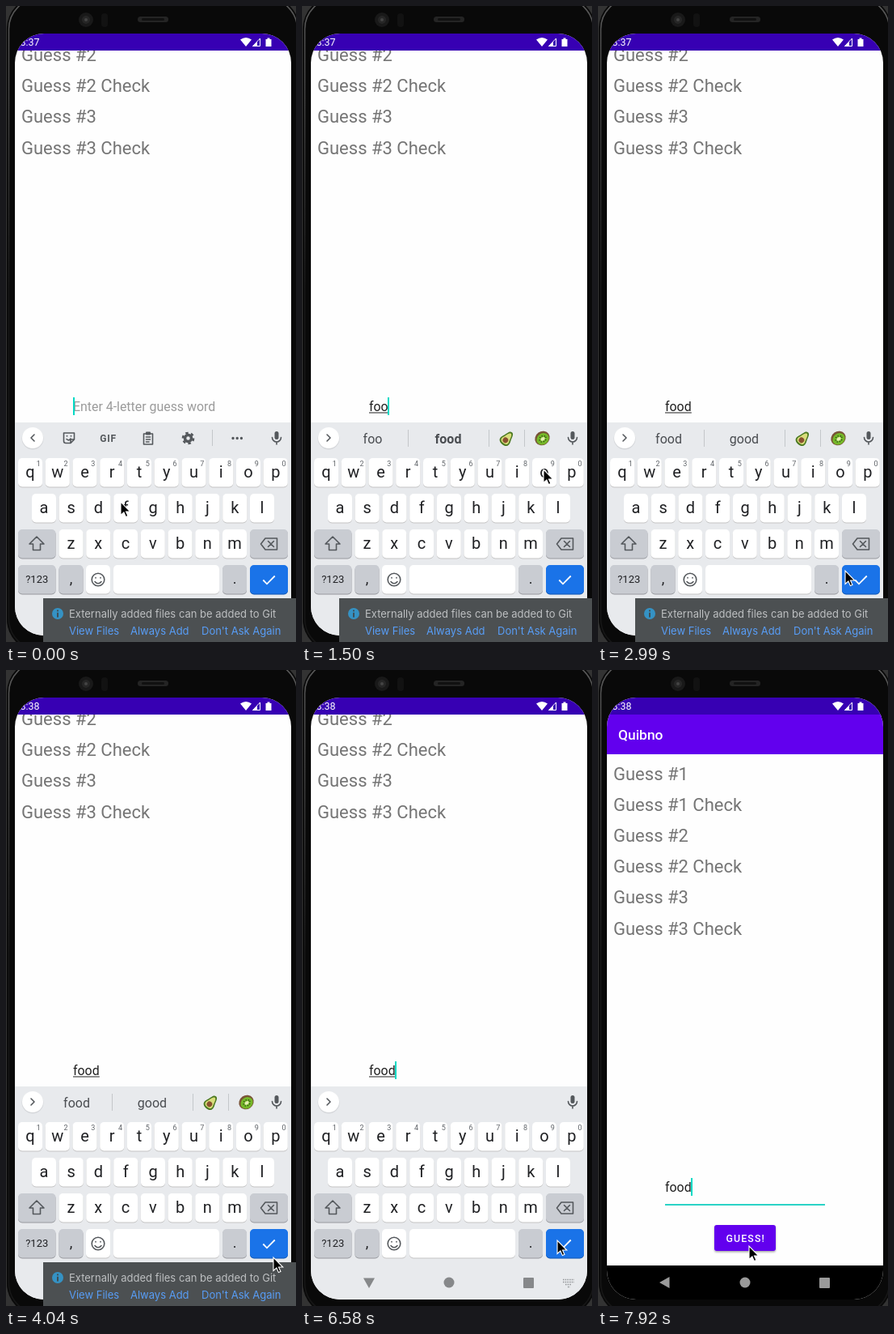
Animation of 359x785 px, one loop 8000 ms. Source, as an HTML page:

```html
<!DOCTYPE html>
<html lang="en">
<head>
<meta charset="utf-8">
<title>Word guessing app</title>
<style>
  html, body { margin: 0; width: 100%; height: 100%; overflow: hidden; background: #2e2e2e; }
  svg { display: block; width: 100vw; height: 100vh; font-family: Roboto, sans-serif; }
  .mid { text-anchor: middle; }
  .line { fill: none; stroke: #54585c; stroke-width: 1.6; stroke-linecap: round; stroke-linejoin: round; }
  .label { font-size: 22px; fill: #757575; }
  .field { font-size: 15.9px; fill: #212121; }
  .key { font-size: 20px; fill: #202124; }
  .digit { font-size: 9px; fill: #5f6368; }
  .word { font-size: 16px; fill: #4a4d51; }
  .toast { font: 13px Inter, sans-serif; fill: #bdbfc1; }
  .toast .link { fill: #589df6; }
</style>
</head>
<body>
<svg viewBox="0 0 359 785" xmlns="http://www.w3.org/2000/svg">
  <defs>
    <clipPath id="screen"><rect x="11" y="34" width="342" height="743" rx="36"/></clipPath>
    <linearGradient id="edge" x1="0" y1="0" x2="0" y2="1">
      <stop offset="0" stop-color="#5a5a5a"/><stop offset=".45" stop-color="#161616"/>
    </linearGradient>
    <filter id="shadow" x="-20%" y="-20%" width="140%" height="160%">
      <feDropShadow dx="0" dy="1.5" stdDeviation="1.2" flood-opacity=".35"/>
    </filter>
  </defs>

  <rect width="359" height="785" fill="#333"/>
  <rect x="1" y="-12" width="362" height="809" rx="40" fill="#090909"/>
  <rect x="3.500" y="-9.500" width="357" height="804" rx="38" fill="none" stroke="url(#edge)" stroke-width="1.500"/>
  <circle cx="99" cy="17" r="9" fill="#191919"/>
  <circle cx="99" cy="17" r="5" fill="#262626"/>
  <circle cx="99" cy="17" r="2" fill="#444"/>
  <rect x="118" y="9" width="8" height="17" rx="4" fill="#121212"/>
  <rect x="163" y="13" width="38" height="7" rx="3.500" fill="#242424"/>
  <rect x="168" y="15" width="28" height="3" rx="1.500" fill="#111"/>

  <g clip-path="url(#screen)">
    <rect x="11" y="34" width="342" height="743" fill="#fefefe"/>
    <g id="app">
      <rect x="11" y="55" width="342" height="49" fill="#6200ee"/>
      <text x="25" y="86" font-size="17.400" font-weight="500" fill="#fff">Quibno</text>
      <g id="labels"></g>
      <text id="entry" class="field" x="83" y="644"></text>
      <rect id="composing" x="83" y="645.500" height="1" fill="#212121"/>
      <rect x="83" y="659" width="198" height="2" fill="#2bd3c6"/>
      <rect id="caret" y="627" width="2" height="22" fill="#03dac5"/>
      <g filter="url(#shadow)"><rect x="144" y="685" width="76" height="32" rx="3" fill="#6200ee"/></g>
      <text x="158.500" y="706" font-size="12.400" font-weight="500" letter-spacing="1.1" fill="#fff">GUESS!</text>
      <rect x="11" y="735" width="342" height="60" fill="#000"/>
    </g>

    <rect x="11" y="34" width="342" height="21" fill="#3700b3"/>
    <text id="clock" x="17.500" y="49.300" font-size="12.500" fill="#fff"></text>
    <path fill="#fff" d="M290 41.500Q297 36.500 304 41.500L297 50ZM321.500 41H323.500V39.500H326.500V41H328.500V50H321.500Z"/>
    <path fill="none" stroke="#fff" d="M305.500 49.500L314.500 40V49.500Z"/>
    <path fill="#fff" d="M305 50L311 44V50Z"/>

    <g id="keyboard">
      <rect x="11" y="514" width="342" height="270" fill="#e8eaed"/>
      <circle cx="33" cy="534" r="13.500" fill="#d5d7da"/>
      <circle cx="33" cy="533" r="13" fill="#fff"/>
      <path id="chevron" class="line" d="M31 529L35 533L31 537"/>
      <rect x="332.500" y="525" width="5" height="10" rx="2.500" fill="#54585c"/>
      <path class="line" d="M329.500 532.500A5.500 5.500 0 0 0 340.500 532.500M335 538V541"/>

      <g id="tools">
        <path class="line" d="M71.500 527H84.500V535L80 539.500H74Q71.500 539.500 71.500 537ZM84 535H80V539M75 534.500Q78 537.500 80 534M75.500 530.500V531M80.500 530.500V531"/>
        <text class="mid" x="126.500" y="537.500" font-size="12" font-weight="700" letter-spacing=".7" fill="#54585c">GIF</text>
        <path class="line" d="M170.500 528H181.500V541H170.500ZM173.500 532H178.500M173.500 535H178.500M173.500 538H177"/>
        <rect x="173" y="525.500" width="6" height="4" rx="1" fill="#54585c"/>
        <circle cx="225.500" cy="533.500" r="6.600" fill="none" stroke="#54585c" stroke-width="2.500" stroke-dasharray="3.450"/>
        <circle cx="225.500" cy="533.500" r="4" fill="none" stroke="#54585c" stroke-width="3.500"/>
        <path stroke="#c4c7ca" d="M255.500 523V543"/>
        <path stroke="#54585c" stroke-width="3.400" stroke-linecap="round" stroke-dasharray="0 5.200" d="M281 533.500H292"/>
      </g>

      <g id="suggestions">
        <path stroke="#c4c7ca" d="M131.500 523V544M231.500 523V544M275.500 523V544"/>
        <text id="first" class="word mid" x="87.500" y="539.500"></text>
        <text id="second" class="word mid" x="181" y="539.500"></text>
        <g transform="translate(253.500 534) rotate(40)">
          <path fill="#4c7a22" d="M0-10C4-10 4-4 6 0C9 7 4 9 0 9S-9 7-6 0C-4-4-4-10 0-10Z"/>
          <path fill="#d9dd7b" d="M0-8C2.500-8 3-3 4.500 1C6.500 6 3 7 0 7S-6.500 6-4.500 1C-3-3-2.500-8 0-8Z"/>
          <circle cy="2.500" r="3.400" fill="#8a5130"/>
        </g>
        <g transform="translate(297.500 533.500) rotate(-35)">
          <ellipse rx="9.500" ry="8.500" fill="#795437"/>
          <ellipse cy="1" rx="8" ry="6.800" fill="#75b828"/>
          <ellipse cy="1" rx="4.300" ry="3.500" fill="none" stroke="#26351a" stroke-width="1.300" stroke-dasharray="1.200 1.900"/>
          <ellipse cy="1" rx="2.800" ry="2" fill="#e6efb4"/>
        </g>
      </g>

      <g id="keys"></g>
      <path class="line" d="M38 655L47 664H42.500V671.500H33.500V664H29Z"/>
      <path class="line" d="M321 657H335.500V671H321L315.500 664ZM324.500 660.500L331.500 667.500M331.500 660.500L324.500 667.500"/>
      <circle class="line" cx="114" cy="708" r="7.800"/>
      <path class="line" d="M110 710.500Q114 715 118 710.500M111 705.500V706M117 705.500V706"/>
      <path fill="none" stroke="#fff" stroke-width="1.800" d="M318.300 708.500L323 713.300L332.800 703.500"/>
      <path stroke="#909396" stroke-width="1.500" stroke-dasharray="1.500 1.200"
        d="M323 752.500H337M323 755.500H337M326 758.500H334M329 761.500H332"/>
    </g>

    <g id="nav">
      <path id="back" d="M76 756L88.500 749V763Z"/>
      <circle cx="182" cy="756" r="6.500"/>
      <rect x="274" y="750" width="13" height="13" rx="1"/>
    </g>
  </g>

  <g id="toast" class="toast">
    <rect x="46" y="731" width="313" height="54" fill="#4c5052"/>
    <circle cx="64" cy="750" r="7" fill="#3592c4"/>
    <path stroke="#40484c" stroke-width="1.800" d="M64 745.500V747.300M64 748.800V754.500"/>
    <text x="78" y="755">Externally added files can be added to Git</text>
    <g class="link">
      <text x="78" y="776">View Files</text>
      <text x="154" y="776">Always Add</text>
      <text x="242" y="776">Don't Ask Again</text>
    </g>
  </g>

  <path id="pointer" d="M0 0V16.500L3.900 13L6.400 18.600L9 17.500L6.500 12H11.800Z" fill="#000" stroke="#fff" stroke-width="1.100"/>
</svg>

<script>
const LOOP = 8000, STEP = 149.4;
const $ = id => document.getElementById(id);
const show = (id, on) => $(id).setAttribute('display', on ? 'inline' : 'none');
const move = (id, x, y) => $(id).setAttribute('transform', `translate(${x} ${y})`);

// A key is its face over a slightly lower, darkened copy.
const face = (x, y, w, fill, more = '') =>
  `<rect x="${x}" y="${y}" width="${w}" height="35.5" rx="5" fill="${fill}" ${more}/>`;

const key = (x, y, w, label = '', fill = '#fff', size = 20) =>
  face(x, y + 1, w, fill) + face(x, y + 1, w, '#000', 'opacity=".24"') + face(x, y, w, fill) +
  `<text class="key mid" x="${x + w / 2}" y="${y + 17.5 + size * .32}" style="font-size:${size}px">${label}</text>`;

const row = (letters, left, y) =>
  [...letters].map((c, i) => key(left + i * 33.75, y, 30, c)).join('');

const digits = [...'1234567890'].map((d, i) =>
  `<text class="digit mid" x="${40.3 + i * 33.75}" y="568">${d}</text>`).join('');

const GREY = '#c9ccd2';
$('keys').innerHTML =
  row('qwertyuiop', 15, 558) + digits +
  row('asdfghjkl', 32, 602) +
  key(15, 646, 46.5, '', GREY) + row('zxcvbnm', 65.5, 646) + key(302, 646, 47, '', GREY) +
  key(15, 690, 46.5, '?123', GREY, 13) + key(65.5, 690, 30, ',', GREY, 18) + key(99, 690, 30) +
  key(133, 690, 131) + key(268, 690, 30, '.', GREY, 18) + key(302, 690, 47, '', '#1a73e8');

$('labels').innerHTML = [0, 1, 2, 3, 4, 5].map(i =>
  `<text class="label" x="19" y="${136 + i * 38.1}">Guess #${(i >> 1) + 1}${i % 2 ? ' Check' : ''}</text>`).join('');

// step, typed text, first and second suggestion
const typing = [[0, '', '', ''], [1, 'f', 'f', 'for'], [8, 'fo', 'fo', 'for'],
  [9, 'foo', 'foo', 'food'], [16, 'food', 'food', 'good']];
const caretOff = [[5, 7], [13, 15], [20, 22], [26, 29], [33, 35], [40, 42], [48, 49]];
// step, x, y
const path = [[0, 142, 612], [1, 142, 612], [7, 299, 572], [10, 299, 572], [14, 110, 621], [16, 110, 621],
  [20, 306, 697], [22, 325, 712], [24, 325, 712], [25, 340, 722], [27, 331, 725], [31, 331, 725],
  [32, 328, 728], [34, 312, 704], [37, 312, 704], [40, 316, 704], [47, 316, 704],
  [48, 305, 670], [50, 235, 606], [52, 192, 690], [53, 187, 711]];

function pointerAt(step) {
  const next = path.findIndex(p => p[0] >= step);
  if (next < 1) return path[0].slice(1);
  const [a, ax, ay] = path[next - 1], [b, bx, by] = path[next];
  const k = (step - a) / (b - a);
  return [ax + (bx - ax) * k, ay + (by - ay) * k];
}

function draw(step) {
  const [, text, first, second] = typing.filter(s => s[0] <= step).pop();
  const closing = step === 45, closed = step > 45, open = step < 45;
  const width = [0, 5.5, 14.7, 23.8, 32.8][text.length];

  move('app', 0, open ? -144 : closing ? -3 : 0);
  const entry = $('entry');
  entry.textContent = text || 'Enter 4-letter guess word';
  entry.style.fill = text ? '#212121' : '#9b9b9b';
  $('composing').setAttribute('width', open ? width : 0);
  $('caret').setAttribute('x', 83 + Math.max(0, width - .8));
  show('caret', !caretOff.some(([a, b]) => step >= a && step <= b));
  $('clock').textContent = step < 25 ? '8:37' : '8:38';

  show('keyboard', !closed);
  move('keyboard', 0, closing ? 138 : 0);
  $('keyboard').setAttribute('opacity', closing ? .16 : 1);
  show('tools', !text);
  show('suggestions', text && step < 43);
  $('chevron').setAttribute('transform', text ? '' : 'rotate(180 33 533)');
  $('first').textContent = first;
  $('second').textContent = second;
  $('second').style.fontWeight = step < 16 ? 700 : 400;

  $('nav').setAttribute('fill', open ? '#86888a' : closing ? '#b5b5b5' : '#9a9a9a');
  $('back').setAttribute('transform', `rotate(${open ? -90 : closing ? -20 : 0} 83 756)`);
  show('toast', step < 30);
  move('pointer', ...pointerAt(step));
}

function tick() {
  draw(Math.floor(performance.now() % LOOP / STEP));
  requestAnimationFrame(tick);
}
tick();
</script>
</body>
</html>
```
